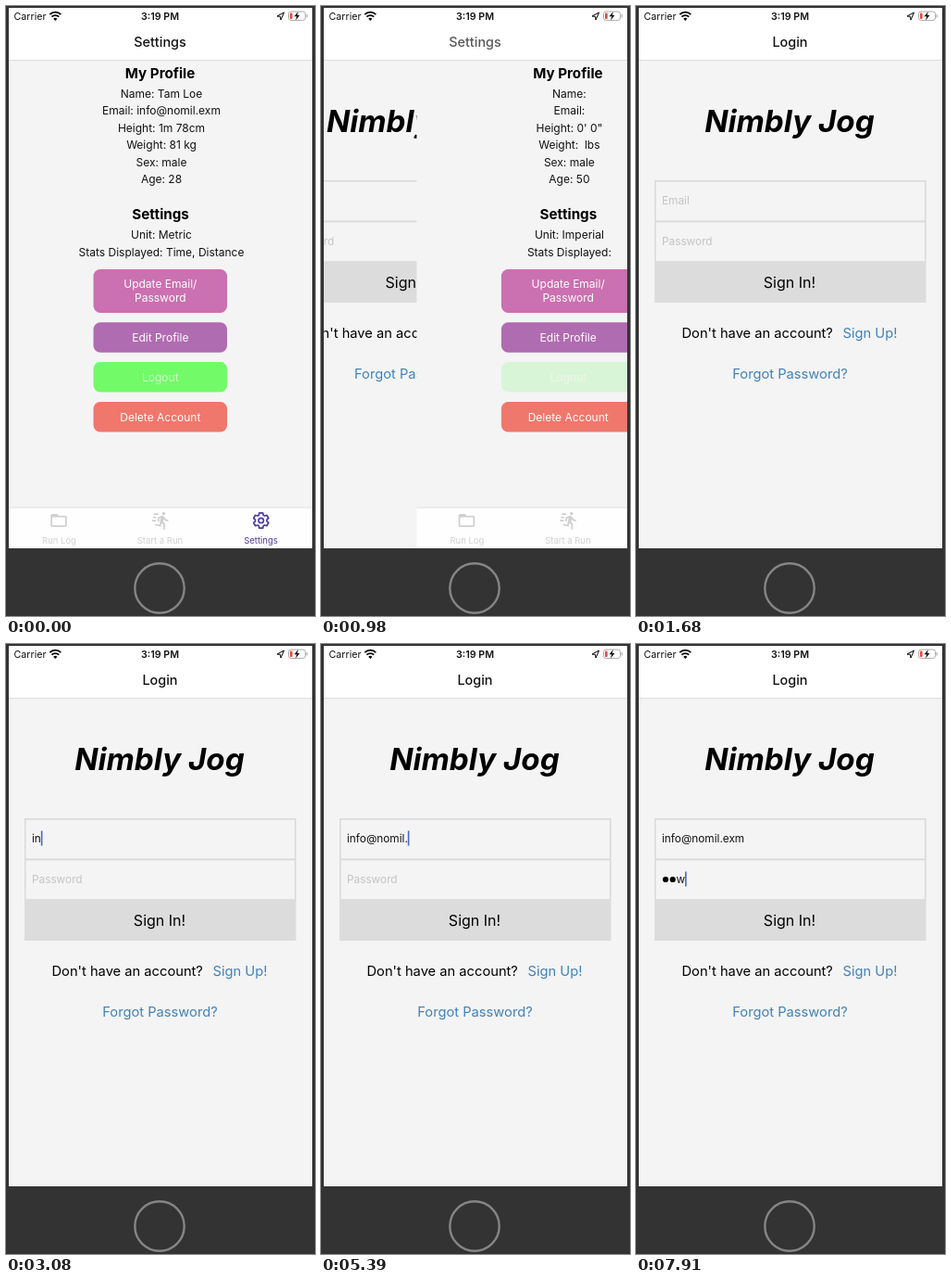
An HTML page that plays this animation: 334 px wide and 658 px high, repeating every 8 s.

```html
<!DOCTYPE html>
<html lang="en">
<head>
<meta charset="utf-8">
<title>Log out and sign in</title>
<style>
  html, body { margin: 0; width: 100%; height: 100%; overflow: hidden; background: #333; }
  svg { display: block; }
  text { font: 12px Inter, "Liberation Sans", sans-serif; fill: #111; white-space: pre; }
  .mid { text-anchor: middle; }
  .head { font-size: 15.2px; font-weight: 700; fill: #000; }
  .bar { font-size: 14.4px; font-weight: 500; }
  .status { font-size: 10.7px; }
  .button { fill: #fff; }
  .tab { font-size: 9.5px; fill: #d0d0d0; }
  .title { font-size: 33.2px; font-weight: 700; font-style: italic; fill: #000; }
  .hint { font-size: 11.8px; fill: #c4c4c8; }
  .entry { font-size: 11.8px; }
  .large { font-size: 14.7px; fill: #000; }
  .link { fill: #3f82bb; }
  .field { fill: none; stroke: #dadada; stroke-width: 1.6; }
</style>
</head>
<body>
<svg width="334" height="658" viewBox="0 0 334 658">
  <clipPath id="screen"><rect x="3" y="2" width="328" height="583"/></clipPath>
  <rect width="334" height="658" fill="#333"/>
  <g clip-path="url(#screen)">
    <rect x="3" y="2" width="328" height="583" fill="#f4f4f4"/>

    <g id="login">
      <text class="title mid" x="166" y="136">Nimbly Jog</text>
      <rect class="field" x="20.8" y="188.8" width="292" height="43.6"/>
      <rect class="field" x="20.8" y="232.4" width="292" height="43.6"/>
      <rect x="20" y="276" width="293.5" height="44" fill="#dcdcdc"/>
      <text class="hint" id="emailHint" x="28" y="214">Email</text>
      <text class="hint" id="passwordHint" x="28" y="258">Password</text>
      <text class="entry" id="email" x="28" y="214"></text>
      <g id="dots"></g>
      <text class="entry" id="password" y="258"></text>
      <rect id="caret" width="1.6" height="16" fill="#4668c8"/>
      <text class="large mid" style="font-size:16px" x="166" y="304">Sign In!</text>
      <text class="large" x="49.5" y="358">Don't have an account?</text>
      <text class="large link" x="223.5" y="358">Sign Up!</text>
      <text class="large link mid" x="166.5" y="401.5">Forgot Password?</text>
    </g>

    <g id="settings">
      <rect x="3" y="58" width="328" height="528" fill="#f4f4f4"/>
      <text class="head mid" x="166.5" y="77.5">My Profile</text>
      <text class="head mid" x="167" y="230">Settings</text>
      <g id="profile"></g>
      <g id="buttons"></g>
      <rect x="3" y="541" width="328" height="44" fill="#fefefe"/>
      <path d="M3 541H331" stroke="#dedede"/>
      <g fill="#d0d0d0">
        <path transform="translate(46.5 544.5) scale(.88)" d="M20 18H4V8H20M20 6H12L10 4H4C2.9 4 2 4.9 2 6V18A2 2 0 0 0 4 20H20A2 2 0 0 0 22 18V8C22 6.9 21.1 6 20 6Z"/>
        <path transform="translate(156 544.5) scale(.88)" d="M16.5 5.5A2 2 0 1 0 14.5 3.5A2 2 0 0 0 16.5 5.5M12.9 19.4L13.9 15L16 17V23H18V15.5L15.9 13.5L16.5 10.5C17.9 12.1 19.9 13 22 13V11C20.2 11 18.6 10.1 17.7 8.6L16.7 7Q16 6 15 6L14.2 6.1L9 8.3V13H11V9.6L12.8 8.9L11.2 17L6.3 16L5.9 18ZM4 9A1 1 0 0 1 4 7H7V9ZM5 5A1 1 0 0 1 5 3H10V5ZM3 13A1 1 0 0 1 3 11H7V13Z"/>
      </g>
      <g transform="translate(275.7 555)" fill="none" stroke="#4f3a9c" stroke-width="1.7" stroke-linejoin="round">
        <path id="gear"/>
        <circle r="2.7"/>
      </g>
      <text class="tab mid" x="57.5" y="580">Run Log</text>
      <text class="tab mid" x="166.5" y="580">Start a Run</text>
      <text class="tab mid" x="275.5" y="580" style="fill:#4f3a9c">Settings</text>
    </g>

    <rect x="3" y="2" width="328" height="56" fill="#fff"/>
    <path d="M3 58.5H331" stroke="#dcdcdc"/>
    <text class="bar mid" id="oldTitle" x="166.5" y="44">Settings</text>
    <text class="bar mid" id="newTitle" x="166.5" y="44">Login</text>

    <text class="status" x="8.5" y="15">Carrier</text>
    <text class="status mid" style="font-weight:600" x="166.5" y="15">3:19 PM</text>
    <g fill="none" stroke="#000" stroke-width="1.8">
      <path d="M47.3 9.2A8.4 8.4 0 0 1 59.3 9.2M49.4 11.7A5.4 5.4 0 0 1 57.2 11.7"/>
      <path d="M53.3 16L51.2 13.8A3 3 0 0 1 55.4 13.8Z" fill="#000" stroke="none"/>
      <path d="M293 11L300.5 7L297 15L296.5 11.3Z" stroke-width="1" stroke-linejoin="round"/>
      <rect x="305.5" y="6" width="18" height="9.4" rx="2.6" stroke="#aaa" stroke-width="1"/>
      <path d="M325.2 9V12.5" stroke="#aaa" stroke-width="1.2"/>
    </g>
    <rect x="307" y="7.5" width="2.6" height="6.4" rx="1" fill="#f0453c"/>
    <path d="M315.8 6L311.6 11.3H314.2L313 15.6L317.4 10H314.8Z"/>
  </g>
  <circle cx="166" cy="628" r="26.7" fill="none" stroke="#858585" stroke-width="2.4"/>
</svg>

<script>
const LOOP = 8000, CLEARED = 420, POP = 920, WIDTH = 328;
const EMAIL = 'info@nomil.exm', PASSWORD = 'new';
const EMAIL_KEYS = [2700, 3075, 3220, 3425, 3985, 4335, 4615, 4755, 4900, 5040, 5250, 5455, 5525, 5595];
const PASSWORD_KEYS = [7275, 7555, 7905];
const EMAIL_FOCUS = 2100, PASSWORD_FOCUS = 6020;

const filled = ['Name: Tam Loe', 'Email: ' + EMAIL, 'Height: 1m 78cm', 'Weight: 81 kg', 'Sex: male', 'Age: 28',
  'Unit: Metric', 'Stats Displayed: Time, Distance'];
const empty = ['Name:', 'Email:', 'Height: 0\' 0"', 'Weight:  lbs', 'Sex: male', 'Age: 50',
  'Unit: Imperial', 'Stats Displayed:'];

const $ = id => document.getElementById(id);
const clamp = v => Math.min(1, Math.max(0, v));

function add(parent, tag, attrs, content = '') {
  const node = document.createElementNS('http://www.w3.org/2000/svg', tag);
  for (const name in attrs) node.setAttribute(name, attrs[name]);
  node.textContent = content;
  return parent.appendChild(node);
}

const lines = filled.map((_, i) =>
  add($('profile'), 'text', { class: 'mid', x: 168, y: i < 6 ? 99 + 18.4 * i : 251.3 + 18.4 * (i - 6) }));

function button(y, height, color, labels, textColor = '#fff') {
  const group = add($('buttons'), 'g', {});
  add(group, 'rect', { x: 94.5, y, width: 144.5, height, rx: 7.5, fill: color });
  labels.forEach((label, i) => add(group, 'text', {
    class: 'button mid', x: 166.8, y: y + height / 2 + 4.3 + 15 * (i - (labels.length - 1) / 2),
    style: `fill:${textColor}`
  }, label));
  return group;
}
button(284, 47, '#cb70b0', ['Update Email/', 'Password']);
button(341.3, 32.5, '#b06cb0', ['Edit Profile']);
const logout = button(384, 32.5, '#73fa69', ['Logout'], '#cffdca');
button(427, 32.5, '#f0776c', ['Delete Account']);

const dots = [0, 1].map(i => add($('dots'), 'circle', { cx: 32 + 7.7 * i, cy: 254, r: 3.1 }));

// Six teeth, four corners each
$('gear').setAttribute('d', 'M' + Array.from({ length: 24 }, (_, i) => {
  const angle = (Math.floor(i / 4) * 60 + [-23, -13, 13, 23][i % 4] - 90) * Math.PI / 180;
  const r = i % 4 === 1 || i % 4 === 2 ? 8.4 : 6.3;
  return `${r * Math.cos(angle)} ${r * Math.sin(angle)}`;
}).join('L') + 'Z');

// Critically damped spring from 0 to 1
function spring(ms) {
  const u = Math.max(0, ms) * 0.01826;
  return 1 - (1 + u) * Math.exp(-u);
}

const typed = (keys, t) => keys.filter(k => t >= k).length;

function draw(t) {
  logout.setAttribute('opacity', 1 - 0.8 * clamp((t - 70) / 180));
  lines.forEach((line, i) => line.textContent = (t < CLEARED ? filled : empty)[i]);

  const p = spring(t - POP);
  $('settings').setAttribute('transform', `translate(${WIDTH * p})`);
  $('login').setAttribute('transform', `translate(${-0.3 * WIDTH * (1 - p)})`);
  $('oldTitle').setAttribute('opacity', 1 - p);
  $('newTitle').setAttribute('opacity', p * p * p);

  const mailCount = typed(EMAIL_KEYS, t), passCount = typed(PASSWORD_KEYS, t);
  const email = $('email'), password = $('password'), caret = $('caret');
  email.textContent = EMAIL.slice(0, mailCount);
  $('emailHint').setAttribute('opacity', mailCount ? 0 : 1);
  $('passwordHint').setAttribute('opacity', passCount ? 0 : 1);

  // Only the last password letter stays readable
  const hidden = Math.max(0, passCount - 1), letterX = 28 + 7.7 * hidden;
  dots.forEach((dot, i) => dot.setAttribute('opacity', i < hidden ? 1 : 0));
  password.setAttribute('x', letterX);
  password.textContent = PASSWORD.slice(hidden, passCount);

  const onPassword = t >= PASSWORD_FOCUS;
  const blink = t < PASSWORD_KEYS[0] ? 1 - clamp((t - 6790) / 200) : 1;
  caret.setAttribute('x', onPassword
    ? letterX + password.getComputedTextLength()
    : 28 + email.getComputedTextLength());
  caret.setAttribute('y', onPassword ? 245.5 : 201.5);
  caret.setAttribute('opacity', t < EMAIL_FOCUS ? 0 : blink);
}

function tick() {
  draw(performance.now() % LOOP);
  requestAnimationFrame(tick);
}
tick();
</script>
</body>
</html>
```
